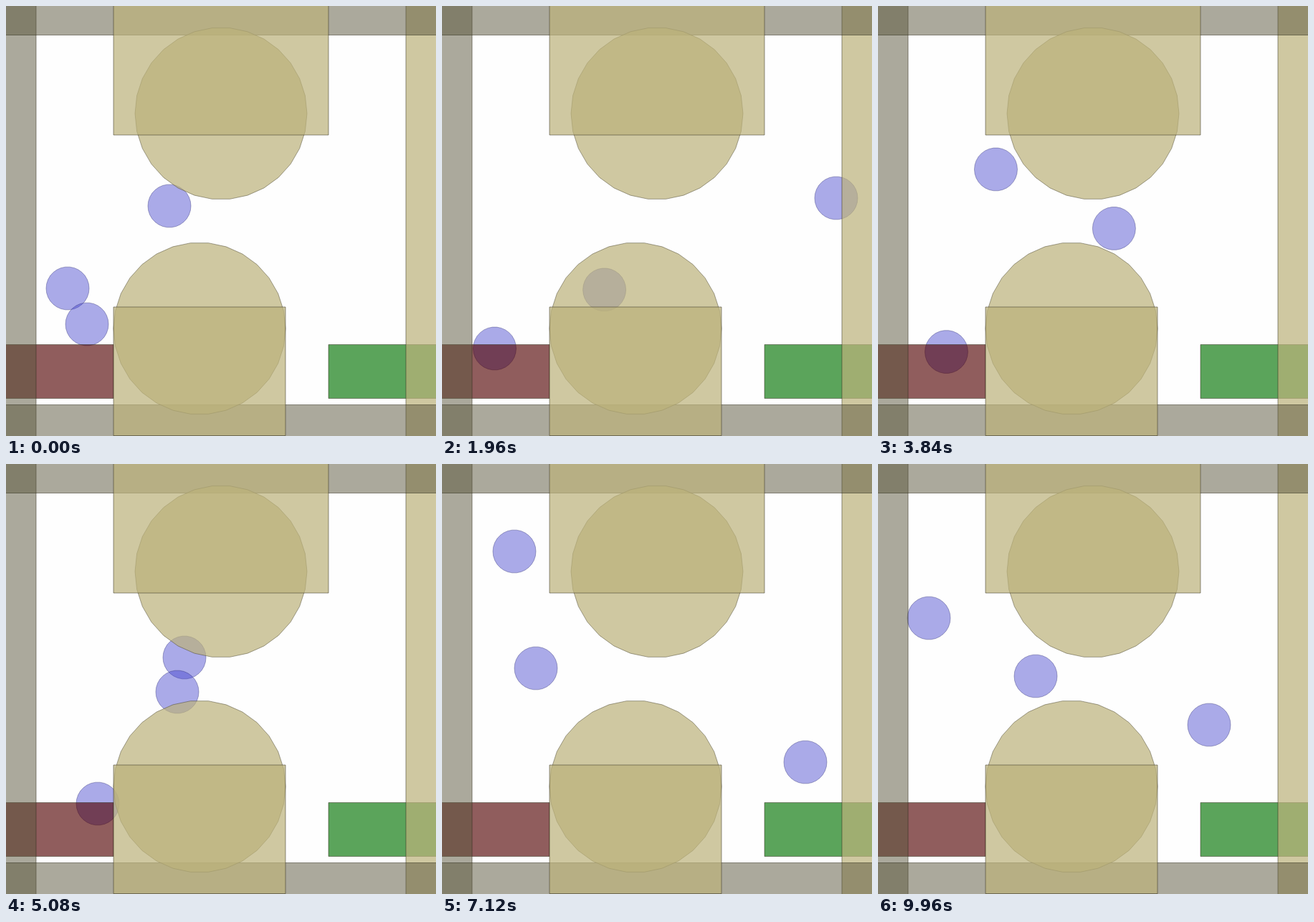
Recreate the animation shown at these times as an HTML page with a canvas. Size 600x600 px, loop 10000 ms.

```html
<!DOCTYPE html>
<html>
<head>
<meta charset="utf-8">
<style>
html, body { margin: 0; height: 100%; overflow: hidden; background: #fefefe; }
canvas { display: block; }
</style>
</head>
<body>
<canvas width="600" height="600"></canvas>
<script>
const ctx = document.querySelector('canvas').getContext('2d');
const LOOP = 10000, STEP = 40;
const TAN = 'rgba(189,179,123,.7)', GREY = 'rgba(91,87,60,.5)';
const BLUE = 'rgba(62,62,202,.44)', RED = 'rgba(82,0,0,.63)', GREEN = 'rgba(0,114,0,.64)';

// Waypoints of each agent: [time in ms, x, y]
const right = [
  [0, 228, 279], [1040, 396, 310], [1960, 550, 268], [2360, 505, 177], [2800, 443, 318],
  [4160, 300, 300], [5080, 249, 270], [6240, 477, 400], [6640, 545, 480], [7120, 507, 416],
  [7320, 443, 435], [8560, 416, 414], [9000, 495, 390], [9960, 462, 364]
];
const upper = [
  [0, 86, 394], [440, 90, 199], [1040, 285, 305], [2800, 144, 425], [3600, 150, 230],
  [5080, 239, 318], [6440, 46, 260], [6940, 85, 91], [7120, 101, 122], [8560, 224, 315],
  [9200, 60, 265], [9960, 71, 215]
];
const lower = [
  [0, 113, 444], [500, 90, 497], [1040, 128, 442], [2400, 51, 490], [2800, 80, 441],
  [4500, 105, 507], [5080, 128, 474], [5700, 70, 517], [7120, 131, 285], [7760, 48, 350],
  [8560, 250, 283], [9960, 220, 296]
];

// Smooth curve through the waypoints
function position(path, t) {
  let i = 0;
  while (i < path.length - 2 && t >= path[i + 1][0]) i++;
  const a = path[i], b = path[i + 1], span = b[0] - a[0];
  const u = Math.min(1, (t - a[0]) / span);
  const before = path[i - 1] || a, after = path[i + 2] || b;
  return [1, 2].map(k => {
    const va = (b[k] - before[k]) / (b[0] - before[0]) * span;
    const vb = (after[k] - a[k]) / (after[0] - a[0]) * span;
    const d = b[k] - a[k];
    return a[k] + u * (va + u * (3 * d - 2 * va - vb + u * (va + vb - 2 * d)));
  });
}

function paint(fill, edge) {
  ctx.fillStyle = fill;
  ctx.fill();
  ctx.strokeStyle = edge;
  ctx.stroke();
}

function box(x, y, w, h, fill) {
  ctx.beginPath();
  ctx.rect(x, y, w, h);
  paint(fill, 'rgba(45,43,25,.5)');
}

function disc(x, y, r, fill, edge) {
  ctx.beginPath();
  for (let i = 0; i < 30; i++) {
    const a = i * Math.PI / 15;
    ctx.lineTo(x + r * Math.cos(a), y - r * Math.sin(a));
  }
  ctx.closePath();
  paint(fill, edge);
}

function draw(t) {
  ctx.fillStyle = '#fefefe';
  ctx.fillRect(0, 0, 600, 600);
  for (const path of [right, upper, lower]) {
    disc(...position(path, t), 30, BLUE, 'rgba(31,31,101,.35)');
  }
  box(-1, 472.5, 151, 75, RED);
  box(450, 472.5, 151, 75, GREEN);
  box(558, -1, 43, 602, TAN);
  box(-1, -1, 43, 602, GREY);
  box(-1, -1, 602, 41.5, GREY);
  box(-1, 556.5, 602, 45, GREY);
  disc(300, 150, 120, TAN, 'rgba(60,57,35,.45)');
  disc(270, 450, 120, TAN, 'rgba(60,57,35,.45)');
  box(150, -1, 300, 181, TAN);
  box(150, 420, 240, 179.5, TAN);
}

function tick(now) {
  const t = now % LOOP;
  draw(t - t % STEP);
  requestAnimationFrame(tick);
}
tick(performance.now());
</script>
</body>
</html>
```
